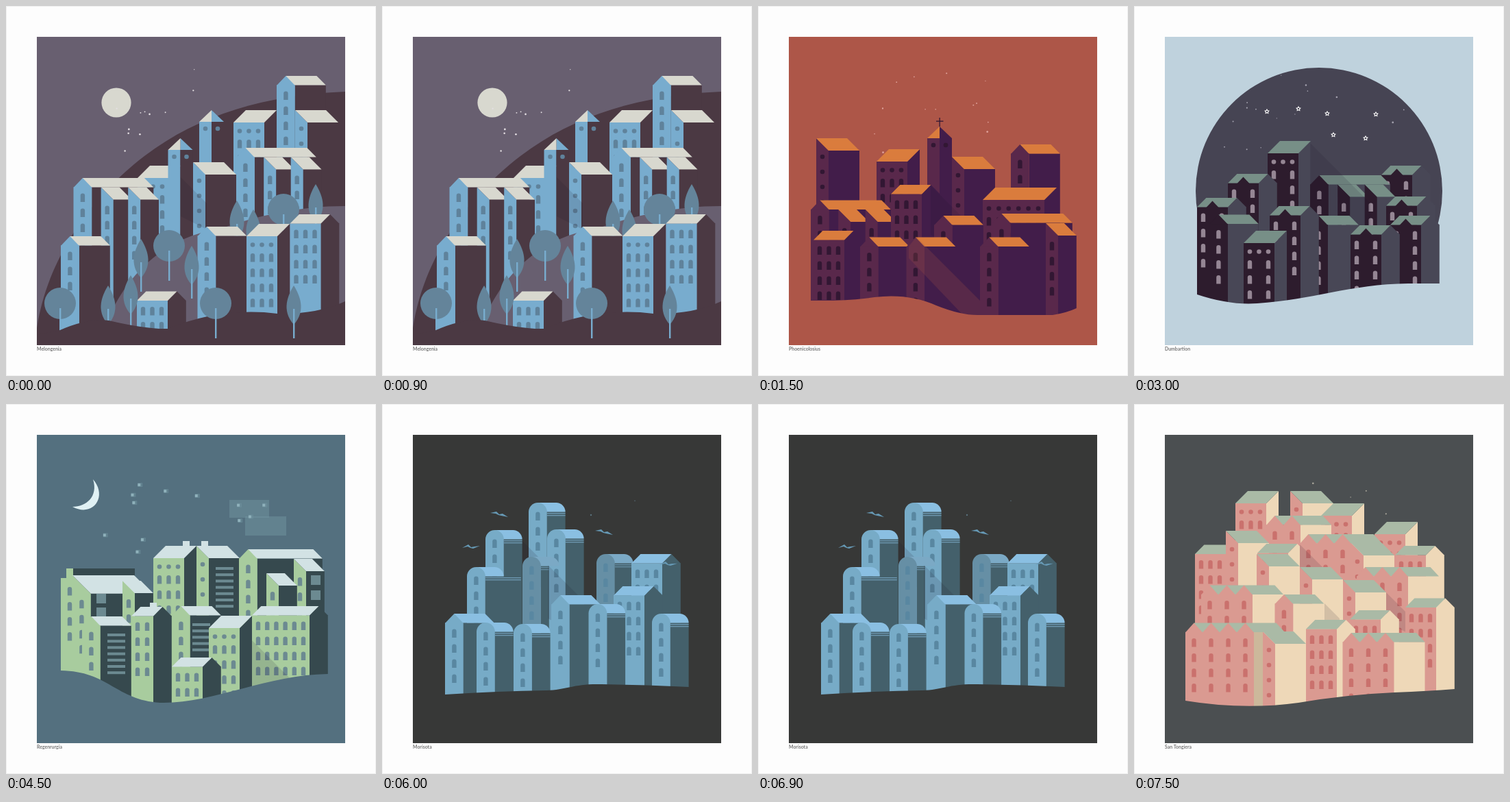
These frames come from a looping animation (540x540 px, 8000 ms). An HTML page with a canvas:

```html
<!DOCTYPE html>
<html lang="en">
<head>
<meta charset="utf-8">
<title>Little towns</title>
<style>
html, body { margin: 0; width: 100%; height: 100%; overflow: hidden; background: #fdfdfd; }
canvas { display: block; width: 540px; height: 540px; }
</style>
</head>
<body>
<canvas id="stage" width="540" height="540"></canvas>
<script>
const c = document.getElementById('stage').getContext('2d');
// Shared proportions: bay is a gable's width, half its rise, lean the rise of a single slope.
const BASE = 480, HALF = 13.4, BAY = 2 * HALF, LEAN = 18, WIDE = 45, STEP = 22;
let pal;

function poly(color, ...p) {
  c.fillStyle = color;
  c.beginPath();
  for (let i = 0; i < p.length; i += 2) c.lineTo(p[i], p[i + 1]);
  c.fill();
}
function path(color, d) {
  c.fillStyle = color;
  c.fill(new Path2D(d));
}
function box(color, x, y, w, h = BASE - y) {
  c.fillStyle = color;
  c.fillRect(x, y, w, h);
}
function disc(color, x, y, r) {
  c.fillStyle = color;
  c.beginPath();
  c.arc(x, y, r, 0, 7);
  c.fill();
}
const shadow = (x, y, s) =>
  poly('rgba(30,20,40,.13)', x, y, x + s, y + s, x + s, y + 2 * s, x, y + 1.5 * s);

function arch(x, top) {
  const r = 3.2;
  path(pal.win, `M${x - r} ${top + 12.5}v-9.3a${r} ${r} 0 0 1 ${2 * r} 0v9.3z`);
}
const porthole = (x, top) => disc(pal.win, x, top, 3.3);
function column(shape, x, top, rows = 4) {
  for (let i = 0; i < rows; i++) shape(x, top + i * STEP);
}
// Evenly spaced windows between the margins of a front that is w wide.
function spread(shape, x, top, w, rows, n = Math.round(w / 15)) {
  for (let i = 0; i < n; i++) column(shape, x + 9 + i * (w - 18) / (n - 1), top, rows);
}

// Row of n gables facing us, with a long wall to the right.
function gable(x, top, length = WIDE, n = 1) {
  const half = n > 1 ? 12.5 : HALF, end = x + 2 * half * n, eave = top + HALF;
  box(pal.wall, end, eave, length);
  poly(pal.roof, x + half, top, end + length - half, top, end + length, eave, x + half, eave);
  box(pal.face, x, eave, end - x);
  for (let i = 0; i < n; i++) {
    const peak = x + half * (2 * i + 1);
    poly(pal.face, peak - half, eave + .5, peak, top, peak + half, eave + .5);
    column(arch, peak, eave + 9);
  }
}
// Narrow face whose single slope falls to the right.
function shed(x, top, length = WIDE, shape = porthole, w = LEAN) {
  const end = x + w, eave = top + w;
  box(pal.wall, end, eave, length);
  poly(pal.face, x, top, end, eave, end, BASE, x, BASE);
  poly(pal.roof, x, top, x + length, top, end + length, eave, end, eave);
  column(shape, x + w / 2, eave + 9);
}
// Long gabled house with two cross wings.
function winged(x, top) {
  gable(x, top, 90);
  for (const i of [0, 1]) shed(x + 3 * HALF + 39.5 * i, top + HALF, BAY, arch);
}
// Broad front under a double-pitched roof.
function house(x, top, w = WIDE) {
  const end = x + w, eave = top + HALF;
  poly(pal.wall, end, eave, end + HALF, top, end + BAY, eave, end + BAY, BASE, end, BASE);
  box(pal.face, x, eave, w);
  poly(pal.roof, x, eave, x + HALF, top, end + HALF, top, end, eave);
  if (pal.dormers) poly(pal.face, x + w / 2 - 9, eave + .5, x + w / 2, eave - 9, x + w / 2 + 9, eave + .5);
  spread(arch, x, eave + 9, w, 4, pal.columns);
}
// Broad front under a single slope, with portholes on the top floor.
function block(x, top, w = WIDE) {
  const end = x + w, eave = top + LEAN;
  poly(pal.wall, end, eave, end + LEAN, top, end + LEAN, BASE, end, BASE);
  box(pal.face, x, eave, w);
  poly(pal.roof, x, eave, x + LEAN, top, end + LEAN, top, end, eave);
  spread(porthole, x, eave + 12.5, w, 1);
  spread(arch, x, eave + 25, w, 4, pal.columns);
}
function tower(x, top, right) {
  const mid = x + LEAN, eave = top + 17;
  box(pal.face, x, eave, LEAN);
  box(pal.wall, mid, eave, LEAN);
  poly(right, mid, eave, mid, top, mid + LEAN, eave);
  poly(pal.roof, x, eave, mid, top, mid, eave);
  spread(porthole, x, eave + 10, 2 * LEAN, 1);
}
function barrel(x, top, length = BAY) {
  const r = HALF, y = top + r, end = x + BAY;
  box(pal.wall, end, y, length);
  path(pal.roof, `M${x + r} ${top}H${end + r}a${r} ${r} 0 0 1 ${r} ${r}H${x + r}Z`);
  path(pal.face, `M${x} ${BASE}V${y}a${r} ${r} 0 0 1 ${BAY} 0V${BASE}Z`);
  for (const i of [1, 2]) box(pal.roof, end, y + 3 * i - 1, length, .8);
  column(arch, x + r, top + r);
}
function chimney(x, y) {
  box(pal.roof, x, y, 10, 9);
}
function slats(x, y, n) {
  for (let i = 0; i < n; i++) box(pal.win, x, y + i * 9.2, 26, 4);
}
function roundTree(x, y) {
  disc(pal.tree, x, y, 23);
  box(pal.face, x - 1, y + 7, 2.4, 44);
}
function leafTree(x, top) {
  path(pal.tree, `M${x} ${top}c8 13 19 36 0 57c-19-21-8-44 0-57`);
  box(pal.face, x - 1, top + 34, 2.4, 43);
}
function star(x, y) {
  const p = [];
  for (let i = 0; i < 10; i++) {
    const a = i * Math.PI / 5 - Math.PI / 2, r = i % 2 ? 2.2 : 4.2;
    p.push(x + r * Math.cos(a), y + r * Math.sin(a));
  }
  poly('#f4f4f4', ...p);
  disc('#464453', x, y, 1.3);
}
function bird(x, y, tilt) {
  poly('#6699b5', x - 13, y - 2 * tilt, x - 4, y - 4, x, y, x + 5, y - 1, x + 13, y + 4 * tilt, x + 3, y + 2, x - 1, y + 1, x - 5, y - 1);
}
function randomizer(seed) {
  return () => (seed = seed * 16807 % 2147483647) / 2147483647;
}
// Loose arc of faint specks above the rooftops.
function specks(color, count, draw = (x, y, size) => disc(color, x, y, .6 + size)) {
  const random = randomizer(4177 + count);
  for (let i = 0; i < count; i++) {
    const a = Math.PI * (1.05 + .8 * random()), r = 80 + 70 * random();
    draw(270 + r * Math.cos(a), 235 + r * Math.sin(a), .8 * random());
  }
}
const ground = d => path(pal.bg, d + 'V495H45Z');

const towns = [
  { name: 'Melongenia', bg: '#685f70', face: '#78acce', wall: '#4b3943', roof: '#d8d8cf', win: '#5f829b', tree: '#64849a',
    draw() {
      disc(pal.roof, 161, 141, 21.6);
      specks('#e4dfe3', 14);
      path(pal.wall, 'M45 470C60 371 122 280 202 219S380 130 495 125V495H45Z');
      block(332, 152);
      gable(395, 102); shed(422, 152);
      tower(282, 152, pal.face);
      winged(336, 207);
      block(192, 233);
      winged(98.5, 251);
      tower(236.5, 193, pal.face);
      shed(273, 228);
      shadow(255, 250, 38);
      path(pal.bg, 'M147 462C178 385 240 335 310 326C370 305 430 292 495 292V495H147Z');
      leafTree(337, 284); leafTree(361, 297); leafTree(452, 260); roundTree(405, 297);
      gable(80, 336); gable(279.5, 322);
      block(351, 318); house(414.5, 304); house(191, 416.5);
      roundTree(79, 434); leafTree(149, 408); leafTree(182, 393);
      path(pal.wall, 'M45 480L79 473Q120 455 150 459Q205 472 236 471Q315 439 396 449Q455 450 495 431V495H45Z');
      roundTree(238, 350); roundTree(306, 434);
      leafTree(197, 340); leafTree(271, 350); leafTree(420, 408);
    } },
  { name: 'Phoenicolosius', bg: '#ad5648', face: '#59284b', wall: '#421d4a', roof: '#da7c3d', win: '#321733',
    draw() {
      specks('#dfa29b', 13);
      shed(85, 193); block(173, 209);
      tower(247, 176, pal.wall);
      box(pal.win, 264.5, 163, 1.3, 13); box(pal.win, 260, 167.5, 10.5, 1.3);
      shed(283, 220); gable(369, 202); block(328, 265, 90);
      winged(77, 283.5);
      house(194, 261);
      shadow(252, 262, 48);
      gable(257, 306); gable(342, 303, 90);
      house(81, 328);
      gable(149, 337.5); gable(216.5, 337.5);
      box(pal.wall, 243, 351, 82);
      poly('rgba(150,75,70,.25)', 220, 351, 231, 337, 325, 431, 325, 455, 303, 455, 220, 368);
      gable(324, 337.5);
      shed(420, 317, BAY, arch);
      ground('M45 430H110Q145 429 170 425Q220 419 260 437Q295 451 320 451H430Q450 448 465 441H495');
    } },
  { name: 'Dumbartion', bg: '#bfd2dd', face: '#2d1c2d', wall: '#484756', roof: '#778f87', win: '#958694', dormers: true, columns: 2,
    draw() {
      disc('#464453', 270, 270, 180);
      specks('#a3a1ae', 15);
      for (const [x, y] of [[194, 154], [240, 150], [282, 157], [353, 158], [291, 188], [338, 193]]) star(x, y);
      house(361, 233); block(195, 197);
      winged(257, 247);
      shadow(257, 200, 88);
      house(137, 245); house(92, 280); house(368, 278);
      gable(110, 304.5);
      box(pal.face, 92, 318, 20); column(arch, 101, 325, 3);
      gable(256, 306);
      house(198, 292); block(160, 328);
      house(374, 306); house(316, 320);
      ground('M45 421H92Q140 437 180 434C260 429 315 406 400 405H495');
    } },
  { name: 'Regenrurgia', bg: '#54707f', face: '#a8cc9e', wall: '#36494e', roof: '#d2e2e4', win: '#6c8a91',
    draw() {
      path('#e0f1f4', 'M127 110C149 135 127 166 97 150C117 150 135 135 127 110');
      const cloud = 'rgba(112,148,160,.5)';
      box(cloud, 326, 140, 58, 26); box(cloud, 349, 164, 60, 28);
      specks('', 12, (x, y) => {
        box(cloud, x - 2, y - 3, 7, 6);
        box('#8fb1bb', x - 2, y - 2, 4, 4);
      });
      chimney(258, 200); chimney(285, 200);
      block(215, 207); shed(278, 207); slats(306, 238, 7);
      gable(340, 212, 95); shed(420, 226, BAY, arch);
      for (const y of [250, 272]) box(pal.win, 445, y, 14, 14);
      shed(380, 247, BAY, arch);
      box(pal.wall, 98, 240, 90, 38);
      box(pal.face, 88, 240, 10); box(pal.face, 80, 254, 20);
      shed(97, 250, 90, arch, BAY);
      shed(170, 258, BAY, arch);
      column(arch, 93, 267);
      for (const y of [277, 297]) box(pal.win, 132, y, 14, 14);
      gable(111, 310); slats(148, 335, 7);
      chimney(210, 290); house(183, 296, 32);
      gable(242, 295); slats(272, 320, 5);
      block(296, 309); house(359, 295, 84);
      shadow(359, 345, 55);
      house(242, 370);
      ground('M45 389H80C150 390 160 432 225 436C300 438 380 395 470 394H495');
    } },
  { name: 'Morisota', bg: '#373837', face: '#77abc7', wall: '#44606b', roof: '#8abfe2', win: '#5987a1',
    draw() {
      specks('#59707b', 5);
      bird(171, 161, 1); bird(130, 209, -.5); bird(324, 187, 1);
      barrel(214, 144); barrel(151, 184);
      shadow(205, 200, 36);
      barrel(241, 183); barrel(124, 238, 52);
      const bright = pal;
      pal = { ...bright, face: '#668fa5', roof: '#7ba9c5' };
      barrel(205, 223, 12); barrel(313, 219);
      pal = bright;
      shadow(242, 235, 52);
      house(364, 219);
      bird(418, 234, -.3);
      house(338, 266); gable(92, 306); gable(247, 279);
      barrel(138, 319); barrel(192, 321); barrel(301.5, 292); barrel(394, 306);
      ground('M45 424H92Q170 419 240 418C270 417 280 408 320 409Q390 410 448 413H495');
    } },
  { name: 'San Tongiera', bg: '#4b4f51', face: '#da9a91', wall: '#eed8b8', roof: '#aabaa6', win: '#ca716d',
    draw() {
      specks('#aaa79c', 6);
      block(148, 127); shed(228, 127); block(273, 145); block(351, 172);
      gable(193, 163, WIDE, 2);
      house(89, 205.5); shed(134, 185);
      house(180, 204); shed(179, 219);
      gable(242, 190, WIDE, 3); shed(317, 203);
      shadow(242, 205, 36);
      house(381, 207); shed(242, 238);
      gable(325, 238, WIDE, 3); shed(305, 257);
      shadow(368, 275, 29);
      gable(98, 264.5, WIDE, 3); gable(205.5, 278);
      shadow(278, 291, 22);
      house(396, 283.5); house(315, 301);
      gable(75, 319.5, WIDE, 4);
      box('#ccb89b', 175, 333, 14);
      shed(188, 332); house(251, 315);
      gable(304.5, 334, WIDE, 3);
      ground('M45 433H75Q160 447 240 436Q310 424 380 421Q430 419 468 416H495');
    } }
];

function render(town) {
  pal = town;
  box('#fdfdfd', 0, 0, 540, 540);
  c.strokeStyle = '#eeeeee';
  c.strokeRect(.5, .5, 539, 539);
  box(town.bg, 45, 45, 450, 450);
  c.save();
  c.beginPath();
  c.rect(45, 45, 450, 450);
  c.clip();
  town.draw();
  c.restore();
  c.fillStyle = '#777777';
  c.font = 'bold 6.9px Lato, sans-serif';
  c.fillText(town.name, 45, 502.6);
}

const LOOP = 8000, HOLD = 1500;
const start = performance.now();
let shown = -1;
function tick() {
  const index = Math.floor((performance.now() - start) % LOOP / HOLD);
  if (index !== shown) render(towns[shown = index]);
  requestAnimationFrame(tick);
}
tick();
</script>
</body>
</html>
```
